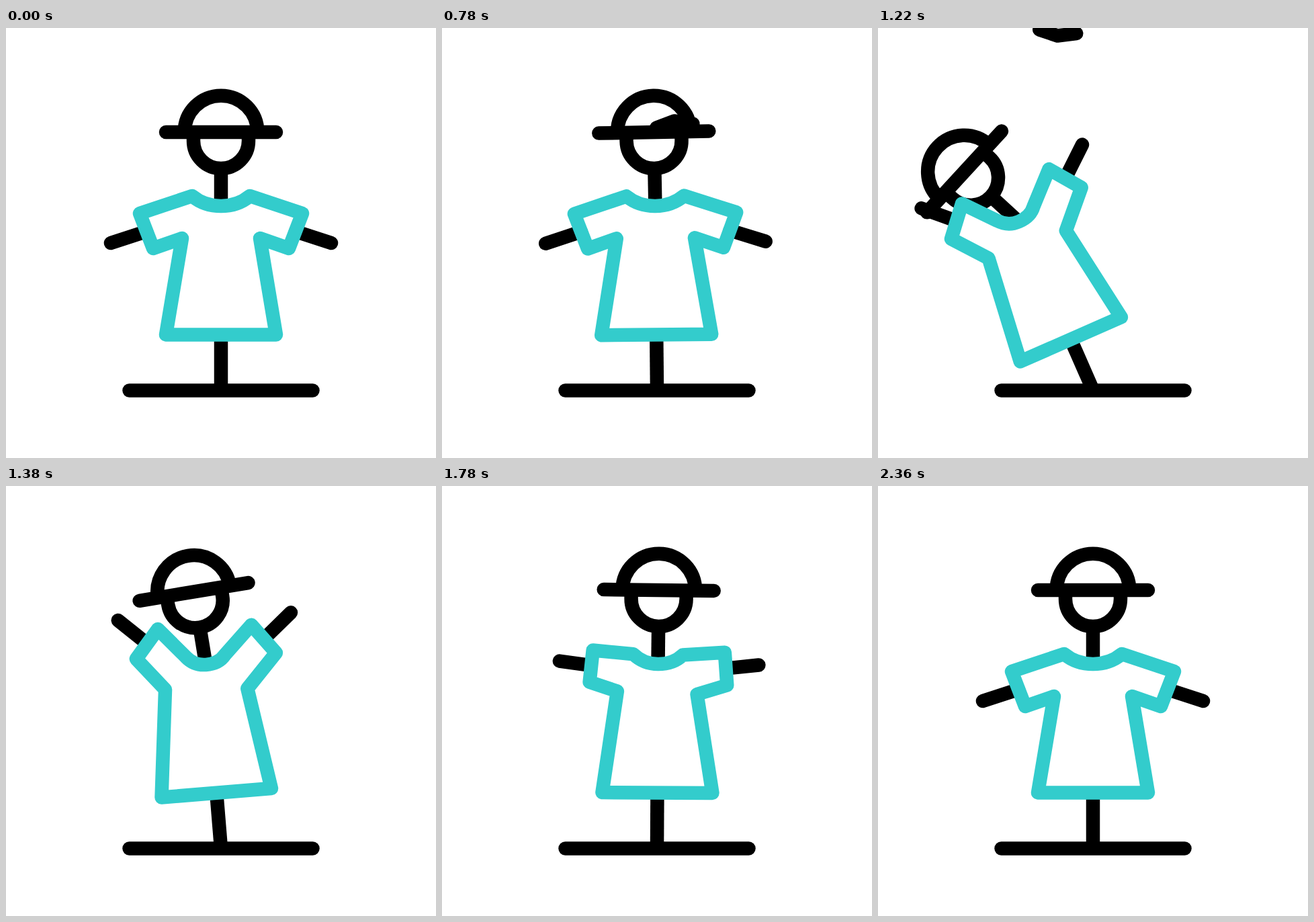
Write an HTML page that moves like this. It is 640 by 640 pixels and loops after 2.4 s.

```html
<!DOCTYPE html>
<html lang="en">
<head>
<meta charset="utf-8">
<title>Scarecrow</title>
<style>
  html, body { margin: 0; width: 100%; height: 100%; overflow: hidden; background: #fff; }
  svg { display: block; width: 100%; height: 100%; }
  path { fill: none; stroke: #000; stroke-width: 20.5; stroke-linecap: round; stroke-linejoin: round; }
  #shirt { stroke: #3cc; }
  .butt { stroke-linecap: butt; }
</style>
</head>
<body>
<svg viewBox="0 0 640 640">
  <path d="M183.5 539.5H456.5"/>
  <g transform="translate(320 539)">
    <g id="body">
      <path class="butt" d="M0 0V-82"/>
      <g id="head">
        <path class="butt" d="M0 -273V-330"/>
        <path class="butt" d="M-54.3 -384A54.3 54.3 0 0 1 54.3 -384"/>
        <path class="butt" d="M-41 -384V-371A41 41 0 0 0 41 -371V-384"/>
        <path d="M-82 -384H82"/>
      </g>
      <path id="arms"/>
      <path id="shirt"/>
    </g>
  </g>
  <path id="bird"/>
</svg>
<script>
const LOOP = 2400;
const el = id => document.getElementById(id);
const [body, head, arms, shirt, bird] = ['body', 'head', 'arms', 'shirt', 'bird'].map(el);

// [time, value] keys
const LEAN = [[740, 0], [1200, -24.1], [1545, 12.05], [1947, -6.6], [2365, 0]];
const RAISE = [[760, 0], [1200, 1], [1545, 1], [1985, 0]];
const TILT = [[400, 15], [640, 6.2], [980, 6.2], [1220, -5.8]];
const RISE = [[955, 0], [1335, 1]];

// Points right of the pole: at rest, and raised for each side
const REST = {
  collar: [43, -289], top: [121, -263], cuff: [101, -211], pit: [58, -226],
  hand: [164, -219], elbow: [111, -236.2]
};
const UP_LEFT = {
  collar: [29, -288], top: [67, -332.6], cuff: [102.7, -291], pit: [63.4, -242],
  hand: [125, -350.5], elbow: [88, -315.5]
};
const UP_RIGHT = {
  collar: [29, -286], top: [72.2, -327.5], cuff: [105.4, -283], pit: [58.6, -233.5],
  hand: [132.3, -341], elbow: [92.5, -308]
};
// Extra cloth bulge halfway through the lift
const BULGE = { top: [0, -5], cuff: [0, 5.5], pit: [4, -9] };

const smooth = x => x * x * (3 - 2 * x);

function track(keys, t) {
  if (t <= keys[0][0]) return keys[0][1];
  for (let i = 1; i < keys.length; i++) {
    const [t0, a] = keys[i - 1], [t1, b] = keys[i];
    if (t < t1) return a + (b - a) * smooth((t - t0) / (t1 - t0));
  }
  return keys[keys.length - 1][1];
}

function side(up, sign, raise, bulge) {
  const pose = {};
  for (const name in REST) {
    const extra = BULGE[name] || [0, 0];
    const [x, y] = REST[name].map((v, i) => v + (up[name][i] - v) * raise + extra[i] * bulge);
    pose[name] = [sign * x, y];
  }
  return pose;
}

function drawBody(t) {
  const lean = track(LEAN, t), raise = track(RAISE, t);
  const bulge = t < 1300 ? 1 - Math.abs(2 * raise - 1) : 0;
  const l = side(UP_LEFT, -1, raise, bulge), r = side(UP_RIGHT, 1, raise, bulge);
  const ease = ([x, y]) => [0.72 * x, y + 10];

  body.setAttribute('transform', `rotate(${lean})`);
  head.setAttribute('transform', `rotate(${lean} 0 -273)`);
  arms.setAttribute('d', `M${l.hand}L${l.elbow}M${r.hand}L${r.elbow}`);
  shirt.setAttribute('d',
    `M${l.collar}L${l.top}L${l.cuff}L${l.pit}L-82 -82.5H82L${r.pit}L${r.cuff}L${r.top}L${r.collar}` +
    `C${ease(r.collar)} ${0.37 * r.collar[0]} -274 0 -274` +
    `C${0.37 * l.collar[0]} -274 ${ease(l.collar)} ${l.collar}Z`);
}

function drawBird(t) {
  if (t < 80 || t > 1335) return bird.setAttribute('d', '');
  const away = Math.pow(Math.max(0, 641 - t) * 0.2845, 1.15);
  const rise = track(RISE, t);
  const x = 345.5 + away - 100 * rise;
  const y = 138.5 + 0.37 * away - 0.0002 * away * away - 162 * rise;
  const flap = 18 * Math.cos(2 * Math.PI * (t - 400) / 193.3 + 0.8);
  const tilt = track(TILT, t);
  const wing = (sign, deg) => {
    const a = deg * Math.PI / 180;
    return [x + sign * 28.3 * Math.cos(a), y + 28.3 * Math.sin(a)];
  };
  bird.setAttribute('d', `M${wing(-1, flap + tilt)}L${x} ${y}L${wing(1, flap - tilt)}`);
}

const start = performance.now();
function frame() {
  const t = (performance.now() - start) % LOOP;
  drawBody(t);
  drawBird(t);
  requestAnimationFrame(frame);
}
frame();
</script>
</body>
</html>
```
